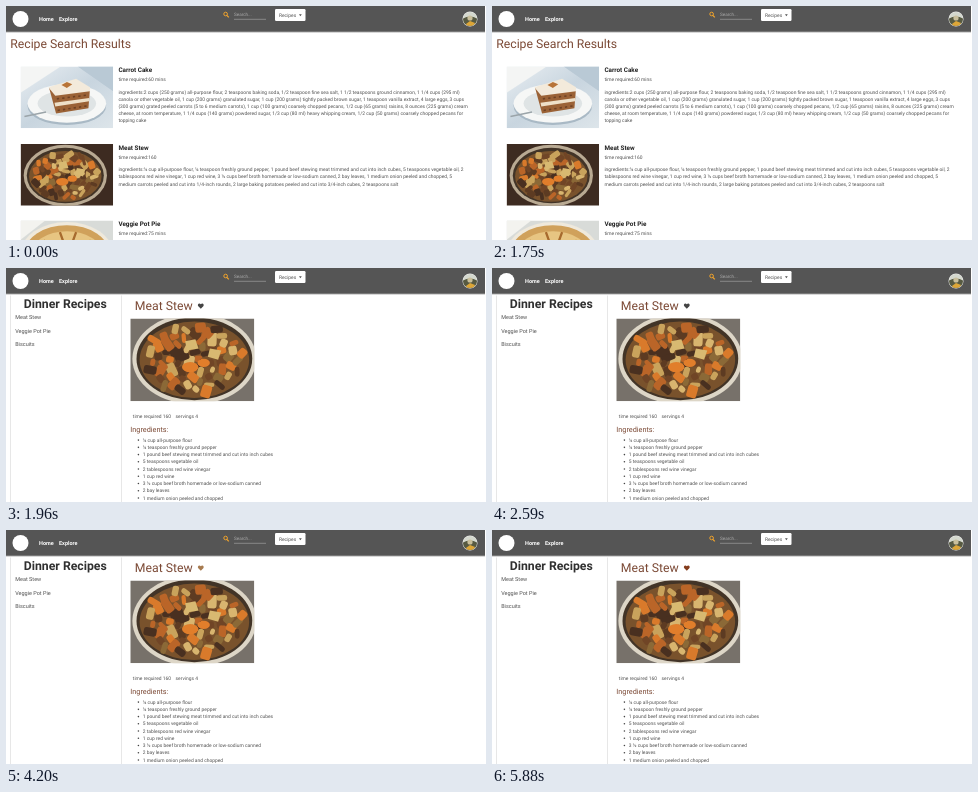
Recreate the animation shown at these times as an HTML page. Size 480 px wide and 234 px high, loop 5.95 s.

```html
<!DOCTYPE html>
<html lang="en">
<head>
<meta charset="utf-8">
<title>Recipe search</title>
<style>
html, body { margin: 0; width: 100%; height: 100%; overflow: hidden; background: #fff; }
svg { display: block; width: 480px; height: 234px; }
text { font: 4.9px Roboto, sans-serif; fill: #505050; text-rendering: geometricPrecision; white-space: pre; }
.title { font-size: 12.25px; fill: #7b4935; }
.side { font-size: 12.25px; font-weight: 700; fill: #303030; }
.card { font-size: 6.35px; font-weight: 700; fill: #222; }
.nav { font-size: 5.5px; font-weight: 700; fill: #fff; }
.item { font-size: 5.5px; }
.sub { font-size: 7.3px; fill: #7b4935; }
.hint { font-size: 4.6px; fill: #aaa; }
</style>
</head>
<body>
<svg id="stage" viewBox="0 0 480 234">
  <defs>
    <linearGradient id="cloth" x2="1" y2="1">
      <stop stop-color="#e9eef2"/><stop offset=".5" stop-color="#c8d5df"/><stop offset="1" stop-color="#dde5ea"/>
    </linearGradient>
    <linearGradient id="shade" x2="0" y2="1">
      <stop stop-color="#999"/><stop offset="1" stop-color="#fff"/>
    </linearGradient>
    <clipPath id="avatarClip"><circle cx="464" cy="13" r="7"/></clipPath>
  </defs>
  <g id="results"></g>
  <g id="recipe"></g>
  <g id="header">
    <rect y="25" width="479" height="2.5" fill="url(#shade)"/>
    <rect width="479" height="25.6" fill="#555"/>
    <circle cx="14.5" cy="13" r="8" fill="#fff"/>
    <g fill="none" stroke="#f0a32c"><circle cx="219.6" cy="8" r="1.8"/><path d="M221 9.5l1.8 1.9" stroke-width="1.2"/></g>
    <path d="M228 13.3h32" stroke="#aaa" stroke-width=".6"/>
    <rect x="269" y="3" width="30.5" height="12" rx="1.2" fill="#fff"/>
    <path d="M293 8.2h2.8l-1.4 2z" fill="#555"/>
    <circle cx="464" cy="13" r="7.5" fill="#eee"/>
    <g clip-path="url(#avatarClip)">
      <rect x="456" y="5" width="16" height="16" fill="#d4d8ce"/>
      <path d="M456 13q8-5 16 0v8h-16z" fill="#575a42"/>
      <circle cx="464" cy="12" r="2.6" fill="#c9bf9c"/>
      <path d="M460 18l4-3 5 2-2 4h-6z" fill="#dda638"/>
    </g>
  </g>
</svg>
<script>
const LOOP = 5950, OPEN_RECIPE = 1820, HOVER_HEART = 3360, SAVE_HEART = 4620;
const LINE = 7.24;
const $ = id => document.getElementById(id);

const text = (x, y, content, style = "") => `<text x="${x}" y="${y}" class="${style}">${content}</text>`;
const lines = (x, y, rows) => rows.map((row, i) => text(x, y + i * LINE, row)).join("");
const photo = (x, y, width, art) =>
  `<svg x="${x}" y="${y}" width="${width}" height="${width * 2 / 3}" viewBox="0 0 120 80">${art}</svg>`;

function randomizer(seed) {
  return () => (seed = (seed * 16807) % 2147483647) / 2147483647;
}

function stew(table, rim, cx, cy, rx, ry, seed) {
  const random = randomizer(seed);
  const colors = ["#c9a35c", "#ba6528", "#5d3b22", "#d8b56f", "#d97a2b", "#704526", "#8b6937", "#493020"];
  let art = `<rect width="120" height="80" fill="${table}"/>
    <ellipse cx="${cx}" cy="${cy}" rx="${rx + 5}" ry="${ry + 5}" fill="${rim}"/>
    <ellipse cx="${cx}" cy="${cy}" rx="${rx + 1}" ry="${ry + 1}" fill="#423427"/>
    <ellipse cx="${cx}" cy="${cy + 1}" rx="${rx - 2}" ry="${ry - 2}" fill="#79522c"/>`;
  for (let i = 0; i < 70; i++) {
    const angle = i * 2.4, spread = Math.sqrt((i + .5) / 70) * .86;
    const x = cx + Math.cos(angle) * rx * spread, y = cy + Math.sin(angle) * ry * spread;
    const w = 6 + random() * 8, h = 4 + random() * 6;
    art += `<rect x="${-w / 2}" y="${-h / 2}" width="${w}" height="${h}" rx="2.4"
      fill="${colors[Math.floor(random() * colors.length)]}"
      transform="translate(${x} ${y}) rotate(${random() * 180})"/>`;
  }
  return art + `<g fill="#e17e2b"><ellipse cx="${cx - 4}" cy="${cy + 8}" rx="8" ry="5"/>
    <ellipse cx="${cx + 9}" cy="${cy + 4}" rx="6" ry="4"/></g>
    <g fill="#d8b971"><path d="M${cx - 9} ${cy - 17}l10-2 3 9-11 2z"/><path d="M${cx + 15} ${cy - 10}l11 2-3 9-10-3z"/></g>`;
}

const cake = `<rect width="120" height="80" fill="url(#cloth)"/>
  <path d="M0 0h52L0 34z" fill="#f4f5f4"/><path d="M74 0h46v32z" fill="#b9c9d5"/>
  <ellipse cx="60" cy="51" rx="51" ry="25" fill="#a9b9c5"/>
  <ellipse cx="60" cy="48" rx="51" ry="25" fill="#f6f7f6"/>
  <ellipse cx="60" cy="48" rx="38" ry="17" fill="#dfe4e5"/>
  <path d="M37 28L73 19l17 10-2 25-42 7z" fill="#9b6236"/>
  <path d="M36 27L72 16l18 11v5l-45 6z" fill="#f3eadb"/>
  <path d="M44 47l45-6v4l-44 7z" fill="#eee0c8"/>
  <path d="M47 42l40-5M48 57l39-6" stroke="#6d4023" stroke-width="2" stroke-dasharray="3 4"/>
  <path d="M53 24l7-4 7 3-7 5z" fill="#b87438"/>
  <path d="M5 65l28-6" stroke="#9ba4a9" stroke-width="2"/>`;

const pie = `<rect width="120" height="80" fill="#d8dbd8"/><path d="M0 0h32L0 25z" fill="#f3f3ef"/>
  <ellipse cx="60" cy="43" rx="60" ry="41" fill="#efe9dc"/>
  <ellipse cx="60" cy="43" rx="55" ry="37" fill="#d0a15b"/>
  <ellipse cx="60" cy="45" rx="47" ry="31" fill="#e7c582"/>
  <path d="M51 15l5 14M72 15l-5 14M30 26l12 9M91 26l-12 9" stroke="#a76b2e" stroke-width="3"/>`;

$("header").innerHTML += text(33, 14.6, "Home", "nav") + text(53, 14.6, "Explore", "nav") +
  text(228, 10, "Search...", "hint") + text(273, 10.9, "Recipes");

$("results").innerHTML = text(4.2, 42.4, "Recipe Search Results", "title") +
  photo(14.6, 60.5, 92.5, cake) +
  text(112.4, 66.3, "Carrot Cake", "card") + text(112.4, 75, "time required:60 mins") +
  lines(112.4, 87.5, [
    "ingredients:2 cups (250 grams) all-purpose flour, 2 teaspoons baking soda, 1/2 teaspoon fine sea salt, 1 1/2 teaspoons ground cinnamon, 1 1/4 cups (295 ml)",
    "canola or other vegetable oil, 1 cup (200 grams) granulated sugar, 1 cup (200 grams) tightly packed brown sugar, 1 teaspoon vanilla extract, 4 large eggs, 3 cups",
    "(300 grams) grated peeled carrots (5 to 6 medium carrots), 1 cup (100 grams) coarsely chopped pecans, 1/2 cup (65 grams) raisins, 8 ounces (225 grams) cream",
    "cheese, at room temperature, 1 1/4 cups (140 grams) powdered sugar, 1/3 cup (80 ml) heavy whipping cream, 1/2 cup (50 grams) coarsely chopped pecans for",
    "topping cake"
  ]) +
  photo(14.6, 138, 92.5, stew("#3d2b21", "#b9aa93", 58, 41, 49, 35, 29)) +
  text(112.4, 143.8, "Meat Stew", "card") + text(112.4, 152.6, "time required:160") +
  lines(112.4, 165.1, [
    "ingredients:¼ cup all-purpose flour, ¼ teaspoon freshly ground pepper, 1 pound beef stewing meat trimmed and cut into inch cubes, 5 teaspoons vegetable oil, 2",
    "tablespoons red wine vinegar, 1 cup red wine, 3 ½ cups beef broth homemade or low-sodium canned, 2 bay leaves, 1 medium onion peeled and chopped, 5",
    "medium carrots peeled and cut into 1/4-inch rounds, 2 large baking potatoes peeled and cut into 3/4-inch cubes, 2 teaspoons salt"
  ]) +
  photo(14.6, 214.5, 92.5, pie) +
  text(112.4, 220.2, "Veggie Pot Pie", "card") + text(112.4, 229.2, "time required:75 mins");

const ingredients = [
  "¼ cup all-purpose flour", "¼ teaspoon freshly ground pepper",
  "1 pound beef stewing meat trimmed and cut into inch cubes", "5 teaspoons vegetable oil",
  "2 tablespoons red wine vinegar", "1 cup red wine",
  "3 ½ cups beef broth homemade or low-sodium canned", "2 bay leaves",
  "1 medium onion peeled and chopped"
];
$("recipe").innerHTML = `<path d="M4.5 26v208M115.5 26v208" stroke="#ddd" stroke-width=".7"/>` +
  text(17.8, 39.8, "Dinner Recipes", "side") +
  ["Meat Stew", "Veggie Pot Pie", "Biscuits"].map((name, i) => text(9.2, 51.4 + i * 13.2, name, "item")).join("") +
  text(128.8, 42.4, "Meat Stew", "title") +
  `<path id="heart" d="M194.8 40.8l-2.5-2.5c-1.5-1.8 1-4 2.5-2 1.5-2 4 .2 2.5 2z"/>` +
  photo(124.3, 50.5, 124, stew("#77716a", "#ddd6c7", 62, 39, 55, 39, 73)) +
  text(126.8, 150.4, "time required 160", "") + text(169.6, 150.4, "servings 4") +
  text(124.3, 164.2, "Ingredients:", "sub") +
  lines(136.8, 173.6, ingredients) +
  ingredients.map((_, i) => `<circle cx="132.4" cy="${172.1 + i * LINE}" r=".8" fill="#444"/>`).join("");

function render(now) {
  const time = now % LOOP;
  const opened = time >= OPEN_RECIPE;
  $("results").style.display = opened ? "none" : "";
  $("recipe").style.display = opened ? "" : "none";
  $("heart").setAttribute("fill", time < HOVER_HEART ? "#444" : time < SAVE_HEART ? "#a77b50" : "#843d1d");
  requestAnimationFrame(render);
}
render(performance.now());
</script>
</body>
</html>
```
